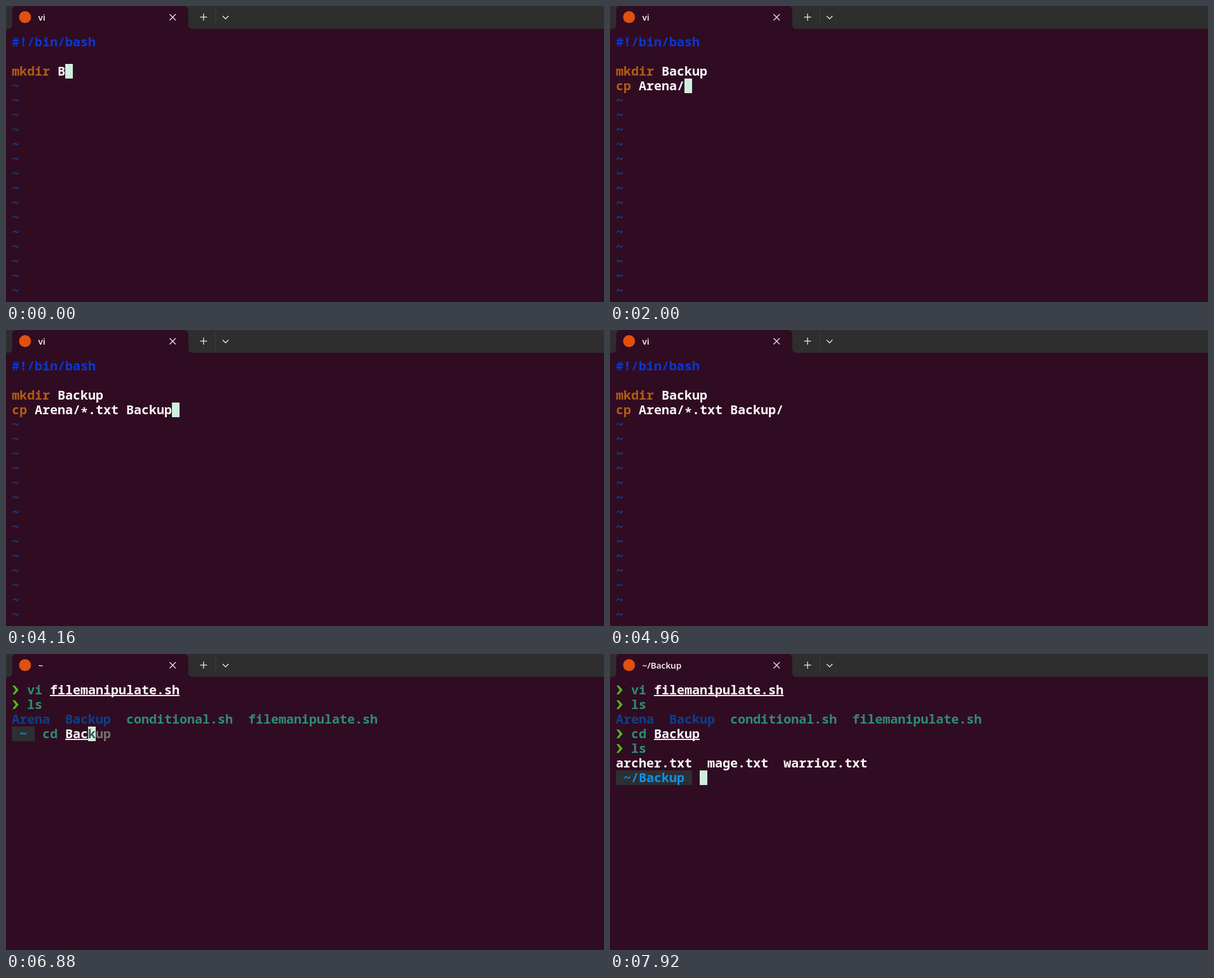
Recreate the animation shown at these times as an HTML page with a canvas. Size 1020 by 506 pixels, loop 8 s.

```html
<!DOCTYPE html>
<html lang="en">
<head>
<meta charset="utf-8">
<title>Terminal session</title>
<style>
  html, body { margin: 0; width: 100%; height: 100%; overflow: hidden; background: #300c22; }
  canvas { display: block; }
</style>
</head>
<body>
<canvas id="stage" width="1020" height="506"></canvas>
<script>
const ctx = document.getElementById('stage').getContext('2d');
const LOOP = 8000, STEP = 80;
const LEFT = 10, TOP = 49, CELL = 13, ROW = 25;
const MONO = '21.667px "Noto Sans Mono", "DejaVu Sans Mono", monospace';
const COLOR = {
  back: '#300c22', bar: '#2e2e2e', white: '#fbf8fa', cursor: '#cfeedd',
  comment: '#0a37d2', keyword: '#b25c16', tilde: '#07489a', folder: '#0b408e',
  command: '#2b8e72', ghost: '#77706f', arrow: '#52ba1c',
  chip: '#2d2f31', path: '#0d92ee', inverse: '#40564f', logo: '#e2500f'
};

// Key press times
const KEYS = {
  mkdir: [80, 160, 240, 320, 400],
  copy: [720, 800, 880, 1120, 1280, 1360, 1520, 1600, 1760, 2240,
         2640, 2720, 2800, 2880, 3120, 3280, 3360, 3440, 3520, 3600, 3760, 4240],
  list: [5840, 5920],
  enter: [6480, 6560, 6640, 6720, 6800, 6880, 7040, 7120, 7200],
  listBackup: [7600, 7680]
};
const AT = { newline: 640, escape: 4640, colon: 4880, shell: 5600,
             listed: 6160, entered: 7360, listedBackup: 7840 };

const typed = (text, times, t) => text.slice(0, times.filter(k => k <= t).length);
const cellX = col => LEFT + col * CELL;
const rowY = row => TOP + row * ROW;

function write(row, col, text, color, weight = 600) {
  ctx.font = weight + ' ' + MONO;
  ctx.fillStyle = color;
  [...text].forEach((ch, i) => {
    ctx.fillText(ch, cellX(col + i), rowY(row) + (ch === '*' ? 24 : 20));
  });
}

function underlined(row, col, text) {
  write(row, col, text, COLOR.white);
  ctx.fillRect(cellX(col), rowY(row) + 21, text.length * CELL, 2);
}

function cursor(row, col, ch = '') {
  ctx.fillStyle = COLOR.cursor;
  ctx.fillRect(cellX(col), rowY(row), CELL, ROW);
  write(row, col, ch, COLOR.inverse);
}

function polyline(points, color, width) {
  ctx.beginPath();
  points.forEach(([x, y]) => ctx.lineTo(x, y));
  ctx.strokeStyle = color;
  ctx.lineWidth = width;
  ctx.stroke();
}

function drawTabs(title) {
  ctx.fillStyle = COLOR.bar;
  ctx.fillRect(0, 0, 1020, 39);
  ctx.fillStyle = COLOR.back;
  ctx.beginPath();
  ctx.moveTo(4, 39);
  ctx.quadraticCurveTo(10.5, 39, 10.5, 32);
  ctx.lineTo(10.5, 8);
  ctx.quadraticCurveTo(10.5, 0, 18, 0);
  ctx.lineTo(303, 0);
  ctx.quadraticCurveTo(311, 0, 311, 8);
  ctx.lineTo(311, 32);
  ctx.quadraticCurveTo(311, 39, 318, 39);
  ctx.fill();

  ctx.fillStyle = COLOR.logo;
  ctx.beginPath();
  ctx.arc(32.5, 19, 10.2, 0, Math.PI * 2);
  ctx.fill();

  ctx.fillStyle = COLOR.white;
  ctx.font = '600 14.8px "Open Sans", "Noto Sans", sans-serif';
  ctx.fillText(title, 55, 25);

  const icon = '#e8e8e8';
  polyline([[279, 14], [289.5, 24.5]], icon, 1.4);
  polyline([[289.5, 14], [279, 24.5]], icon, 1.4);
  polyline([[331, 19], [343, 19]], icon, 1.4);
  polyline([[337, 13], [337, 25]], icon, 1.4);
  polyline([[357.5, 4], [357.5, 33]], '#3d3d3d', 1);
  polyline([[369.5, 17], [374.5, 22], [379.5, 17]], icon, 1.5);
}

function drawEditor(t) {
  write(0, 0, '#!/bin/bash', COLOR.comment);
  const folder = 'B' + typed('ackup', KEYS.mkdir, t);
  write(2, 0, 'mkdir', COLOR.keyword);
  write(2, 6, folder, COLOR.white);

  const copying = t >= AT.newline;
  for (let row = copying ? 4 : 3; row < 18; row++) write(row, 0, '~', COLOR.tilde, 700);
  if (!copying) return cursor(2, 6 + folder.length);

  const line = typed('cp Arena/*.txt Backup/', KEYS.copy, t);
  write(3, 0, line.slice(0, 2), line.length > 1 ? COLOR.keyword : COLOR.white);
  write(3, 2, line.slice(2), COLOR.white);
  if (t < AT.escape) cursor(3, line.length);
  else if (t < AT.colon) cursor(3, line.length - 1, '/');
}

function drawArrow(row) {
  const y = rowY(row);
  ctx.fillStyle = COLOR.arrow;
  ctx.beginPath();
  [[11, 5], [15, 5], [21.5, 12.5], [15, 20], [11, 20], [16.5, 12.5]]
    .forEach(([x, dy]) => ctx.lineTo(x, y + dy));
  ctx.fill();
}

function drawCommand(row, col, text) {
  const name = text.split(' ')[0];
  write(row, col, name, COLOR.command);
  underlined(row, col + name.length + 1, text.slice(name.length + 1));
}

function drawDone(row, text) {
  drawArrow(row);
  drawCommand(row, 2, text);
}

function drawPrompt(row, path, text, hint = '') {
  const width = path.length + 2, end = width + 1 + text.length;
  ctx.fillStyle = COLOR.chip;
  ctx.fillRect(LEFT, rowY(row), width * CELL, ROW);
  write(row, 1, path, COLOR.path, 700);
  drawCommand(row, width + 1, text);
  cursor(row, end, hint.slice(0, 1));
  write(row, end + 1, hint.slice(1), COLOR.ghost);
}

function drawShell(t) {
  drawDone(0, 'vi filemanipulate.sh');
  if (t < AT.listed) return drawPrompt(1, '~', typed('ls', KEYS.list, t));

  drawDone(1, 'ls');
  write(2, 0, 'Arena  Backup', COLOR.folder);
  write(2, 15, 'conditional.sh  filemanipulate.sh', COLOR.command);
  if (t < AT.entered) {
    const full = 'cd Backup', text = typed(full, KEYS.enter, t);
    return drawPrompt(3, '~', text, text && full.slice(text.length));
  }

  drawDone(3, 'cd Backup');
  if (t < AT.listedBackup) return drawPrompt(4, '~/Backup', typed('ls', KEYS.listBackup, t));

  drawDone(4, 'ls');
  write(5, 0, 'archer.txt  mage.txt  warrior.txt', COLOR.white);
  drawPrompt(6, '~/Backup', '');
}

function draw(t) {
  ctx.fillStyle = COLOR.back;
  ctx.fillRect(0, 0, 1020, 506);
  const editing = t < AT.shell;
  drawTabs(editing ? 'vi' : t < AT.entered ? '~' : '~/Backup');
  (editing ? drawEditor : drawShell)(t);
}

const start = performance.now();
function tick() {
  const t = (performance.now() - start) % LOOP;
  draw(Math.floor(t / STEP) * STEP);
  requestAnimationFrame(tick);
}
tick();
</script>
</body>
</html>
```
